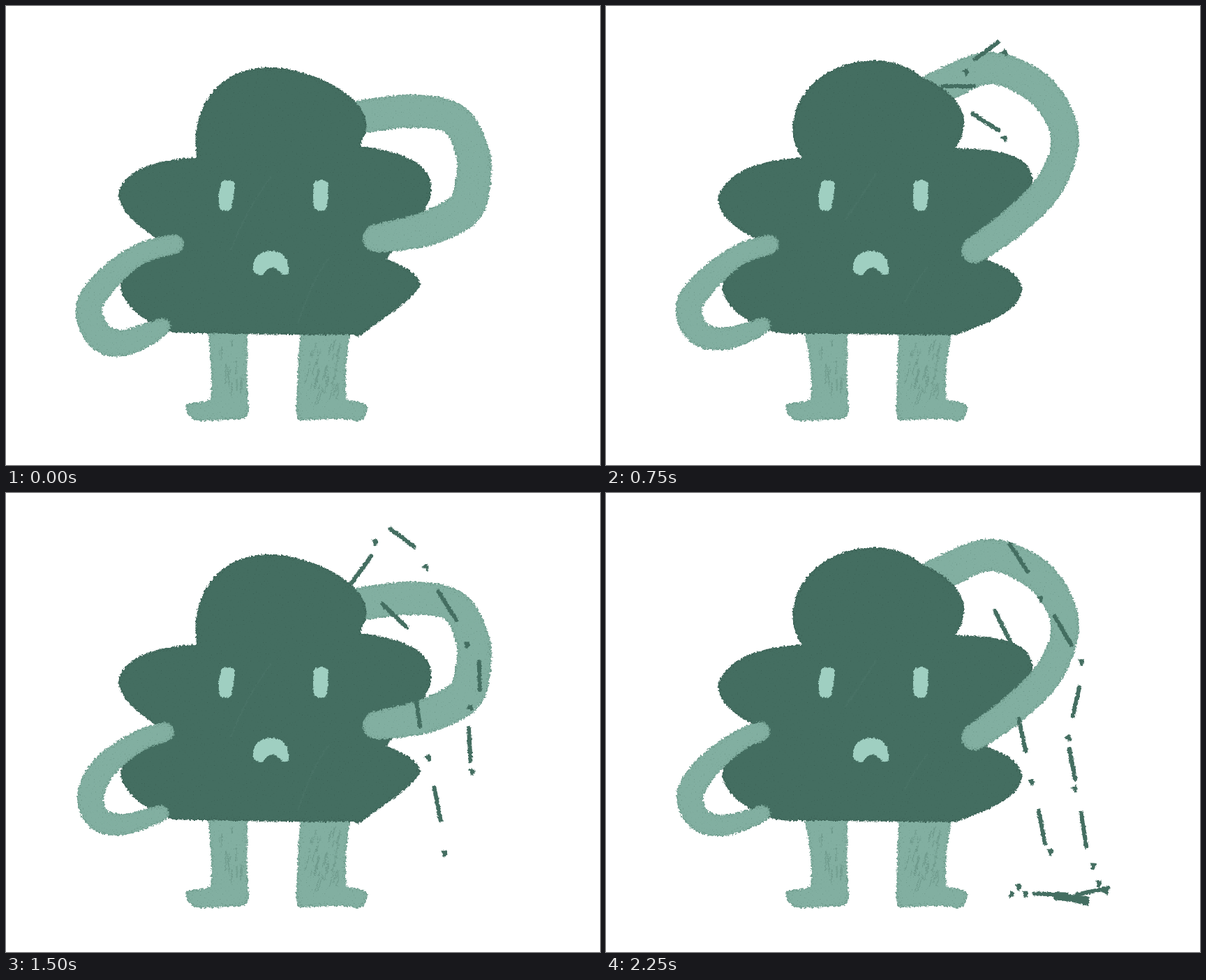
An HTML page for the animation above (2.5 s loop, 851 px wide and 658 px high).

```html
<!DOCTYPE html>
<html lang="en">
<head>
<meta charset="utf-8">
<title>Shedding tree</title>
<style>
html, body { margin: 0; width: 100%; height: 100%; overflow: hidden; background: #fff; }
svg { display: block; width: 851px; height: 658px; }
</style>
</head>
<body>
<svg viewBox="0 0 851 658">
  <defs id="defs"></defs>
  <clipPath id="headBox"><rect x="250" y="60" width="272" height="138"/></clipPath>
  <g id="legs" fill="#82afa1" filter="url(#chalk)"></g>
  <g id="body" fill="#446e61" filter="url(#crayon)"></g>
  <g id="face" fill="#9fcfc1" filter="url(#soft)"></g>
  <g id="arms" fill="#82afa1" filter="url(#chalk)"></g>
  <g clip-path="url(#headBox)"><g id="head" fill="#446e61" filter="url(#crayon)"></g></g>
  <g id="needles" fill="#446e61" stroke="#446e61" stroke-linecap="round" filter="url(#soft)"></g>
</svg>
<script>
const STEP = 250, COUNT = 10;
const $ = id => document.getElementById(id);
const path = (d, attrs = '') => `<path d="${d}" ${attrs}/>`;
const repeat = (n, fn) => Array.from({ length: n }, (_, i) => fn(i)).join('');

// Repeatable random number in -1..1.
function rand(seed) {
  const v = Math.sin(seed * 127.1 + 11.7) * 43758.5453;
  return (v - Math.floor(v)) * 2 - 1;
}

// Catmull-Rom point at u on an open curve; every coordinate is interpolated.
function along(points, u) {
  const last = points.length - 1;
  u = Math.max(0, Math.min(last, u));
  const i = Math.min(Math.floor(u), last - 1), t = u - i;
  const [p, q, r, s] = [-1, 0, 1, 2].map(k => points[Math.max(0, Math.min(last, i + k))]);
  return q.map((v, k) => v + t / 2 * (r[k] - p[k] +
    t * (2 * p[k] - 5 * v + 4 * r[k] - s[k] + t * (3 * (v - r[k]) + s[k] - p[k]))));
}

// Rough edge; the optional grain gets denser towards the outline.
function roughFilter(id, scale, color, opacity) {
  const speckle = color ? `
    <feTurbulence type="fractalNoise" baseFrequency=".5" numOctaves="2" seed="8" result="dust"/>
    <feGaussianBlur in="SourceAlpha" stdDeviation="4" result="inside"/>
    <feComposite in="dust" in2="inside" operator="arithmetic" k2="1" k3="-.5" result="grain"/>
    <feComponentTransfer in="grain" result="mask">
      <feFuncA type="linear" slope="8" intercept="-1.5"/></feComponentTransfer>
    <feFlood flood-color="${color}" flood-opacity="${opacity}"/>
    <feComposite in2="mask" operator="in"/>
    <feComposite in2="shape" operator="in" result="specks"/>
    <feMerge><feMergeNode in="shape"/><feMergeNode in="specks"/></feMerge>` : '';
  return `<filter id="${id}" filterUnits="userSpaceOnUse" x="0" y="0" width="851" height="658"
    color-interpolation-filters="sRGB">
    <feTurbulence type="fractalNoise" baseFrequency=".35" numOctaves="2" seed="3" result="noise"/>
    <feDisplacementMap in="SourceGraphic" in2="noise" scale="${scale}"
      xChannelSelector="R" yChannelSelector="G" result="shape"/>${speckle}</filter>`;
}

$('defs').innerHTML = roughFilter('chalk', 6, '#5d8678', .55) +
  roughFilter('crayon', 5, '#35574c', .55) + roughFilter('soft', 4);

// Two alternating poses: hand on the side of the head, hand on top.
// Arm points are x, y, radius.
const poses = [
  {
    body: `M273,217 C269,180 274,150 299,120 C320,98 345,88 380,88 C420,90 460,105 490,128
      C512,145 518,162 516,178 C513,190 508,195 508,201 C540,205 570,212 590,226
      C606,238 610,250 609,268 C608,290 575,325 545,363 C570,372 592,385 594,400
      C585,420 540,448 505,474 L495,471 C420,472 340,470 270,469 L240,468
      C210,460 170,435 164,405 C166,375 200,350 213,331 C190,315 164,297 161,270
      C166,238 210,220 273,217Z`,
    arm: [[490, 162, 24], [575, 151, 24], [640, 161, 23], [668, 208, 24], [669, 255, 25],
      [655, 292, 26], [606, 318, 25], [552, 330, 22], [531, 333, 20]],
    legX: [290, 422, 493],
    streaks: 'M380,245 Q345,290 322,350 M462,362 Q440,390 418,455'
  },
  {
    body: `M280,217 C260,185 265,150 289,120 C314,90 350,78 390,78 C415,80 440,90 450,101
      C475,112 508,128 513,165 C512,185 505,198 500,204 C545,205 580,208 600,225
      C612,238 613,252 609,262 C602,285 570,335 545,364 C575,373 597,390 596,408
      C590,440 545,455 500,472 C440,471 330,470 270,470 C235,470 215,460 188,440
      C163,415 163,400 173,385 C184,365 205,350 213,333 C180,316 163,300 160,275
      C173,240 210,222 280,217Z`,
    arm: [[470, 121, 25], [547, 89, 23], [614, 114, 23], [650, 160, 21], [656, 208, 20],
      [630, 264, 21], [580, 313, 21], [528, 350, 19]],
    legX: [284, 420, 496],
    streaks: 'M387,240 Q365,275 343,306 M460,375 Q440,400 428,425'
  }
];

function tube(points) {
  const n = 90;
  return repeat(n + 1, i => {
    const [x, y, r] = along(points, i / n * (points.length - 1));
    return `<circle cx="${x}" cy="${y}" r="${r}"/>`;
  });
}

// The resting arm tightens with time and trembles a little on every step.
function restingArm(step) {
  const slack = Math.exp(-step / 2), shake = k => rand(step * 9 + k) * 1.5;
  return tube([
    [240 - 2 * step, 342, 14], [190, 356, 15], [143, 393, 18], [120, 432, 19],
    [133, 467 + 7 * slack, 17 + 3 * slack], [167, 476 + 6 * slack, 15 + 4 * slack],
    [205, 466 + 3 * slack, 13 + 3 * slack], [224, 458, 11]
  ].map(([x, y, r], k) => [x + shake(k), y + shake(k + 5), r]));
}

// Two streams of needles run from the scratched spot to the floor.
const lanes = [
  {
    points: [[505, 115], [560, 60], [625, 150], [677, 250], [664, 350], [676, 430], [692, 530]],
    gap: 1,
    phase: step => .12 * (step - 5),
    from: step => step < 7 ? -.3 : 1
  },
  {
    points: [[535, 160], [572, 200], [592, 325], [614, 425], [632, 520]],
    gap: 1.3,
    phase: step => .1 * step,
    from: () => 0
  }
];

function needle(x, y, angle, length) {
  const dx = Math.cos(angle) * length / 2, dy = Math.sin(angle) * length / 2;
  return path(`M${x - dx},${y - dy}L${x + dx},${y + dy}`, 'stroke-width="6"');
}

function crumb(x, y, seed) {
  return path('M-5,-3 L3,-5 L5,-1 L3,5 L-1,5 L-1,1Z',
    `stroke="none" transform="translate(${x} ${y}) rotate(${rand(seed) * 40})"`);
}

function stream({ points, gap, phase, from }, step) {
  const end = Math.min(points.length - 1, step - 1.7);
  return repeat(8, i => {
    const u = i * gap + phase(step), seed = step * 20 + i;
    if (u < from(step) || u > end) return '';
    const [x, y] = along(points, u);
    const [ax, ay] = along(points, u - .1), [bx, by] = along(points, u + .1);
    const [cx, cy] = along(points, u + gap / 2);
    return needle(x, y, Math.atan2(by - ay, bx - ax), 46 + 6 * rand(seed)) +
      crumb(cx + 8 * rand(seed + 3), cy + 6 * rand(seed + 7), seed);
  });
}

// Needles that have landed stay on the floor.
function pile(step) {
  const landed = Math.max(0, 2 * (step - 6) - 1);
  return repeat(landed, i =>
    needle(667 - 30 * (i % 3 - 1) * (i > 0), 583 - 4 * (i % 4), .25 * rand(i), 46) +
    crumb(650 + (i % 2 ? 1 : -1) * (50 + 5 * i), 565 + 10 * rand(i + 4), i));
}

function legs([left, right, edge]) {
  const grain = (n, x, spread, slant) => repeat(n, i => {
    const sx = x + spread * rand(i + x), sy = 515 + 38 * rand(i * 3 + x), len = 14 + 10 * rand(i);
    return `M${sx},${sy}l${-slant * len},${len}`;
  });
  return path(`M${left},466 L346,466 C346,510 344,545 348,575 C348,588 345,591 335,592
      L275,595 C262,591 256,582 258,571 C270,566 285,570 293,564 C296,540 293,505 ${left},466Z`) +
    path(`M${right},466 L${edge},466 C488,500 485,540 488,563 C500,570 510,564 518,574
      C518,585 512,595 503,596 C490,590 460,592 425,594 C416,594 416,585 416,570
      C417,535 ${right - 3},500 ${right},466Z`) +
    path(grain(14, 320, 22, 0) + grain(34, 458, 24, .3),
      'fill="none" stroke="#5d8678" stroke-width="1.3" opacity=".5"');
}

function face() {
  return path('M308,254 C310,249 324,249 327,253 C328,268 325,282 322,291 C318,295 308,294 306,289 C303,275 306,265 308,254Z') +
    path('M441,254 C445,248 458,249 461,253 C462,266 461,280 459,291 C455,295 445,294 442,290 C439,278 440,265 441,254Z') +
    path(`M354,375 C354,360 365,351 380,351 C395,351 407,362 405,382
      C400,388 395,385 391,380 C385,372 373,374 369,385 C362,388 354,383 354,375Z`);
}

function draw(step) {
  const pose = poses[step % 2];
  $('legs').innerHTML = legs(pose.legX);
  $('body').innerHTML = path(pose.body) +
    path(pose.streaks, 'fill="none" stroke="#557d70" stroke-width="2" opacity=".35"');
  $('head').innerHTML = path(pose.body);
  $('arms').innerHTML = tube(pose.arm) + restingArm(step);
  $('needles').innerHTML = lanes.map(lane => stream(lane, step)).join('') + pile(step);
}

$('face').innerHTML = face();
let shown = -1;
function tick() {
  const step = Math.floor(performance.now() / STEP) % COUNT;
  if (step !== shown) draw(shown = step);
  requestAnimationFrame(tick);
}
tick();
</script>
</body>
</html>
```
